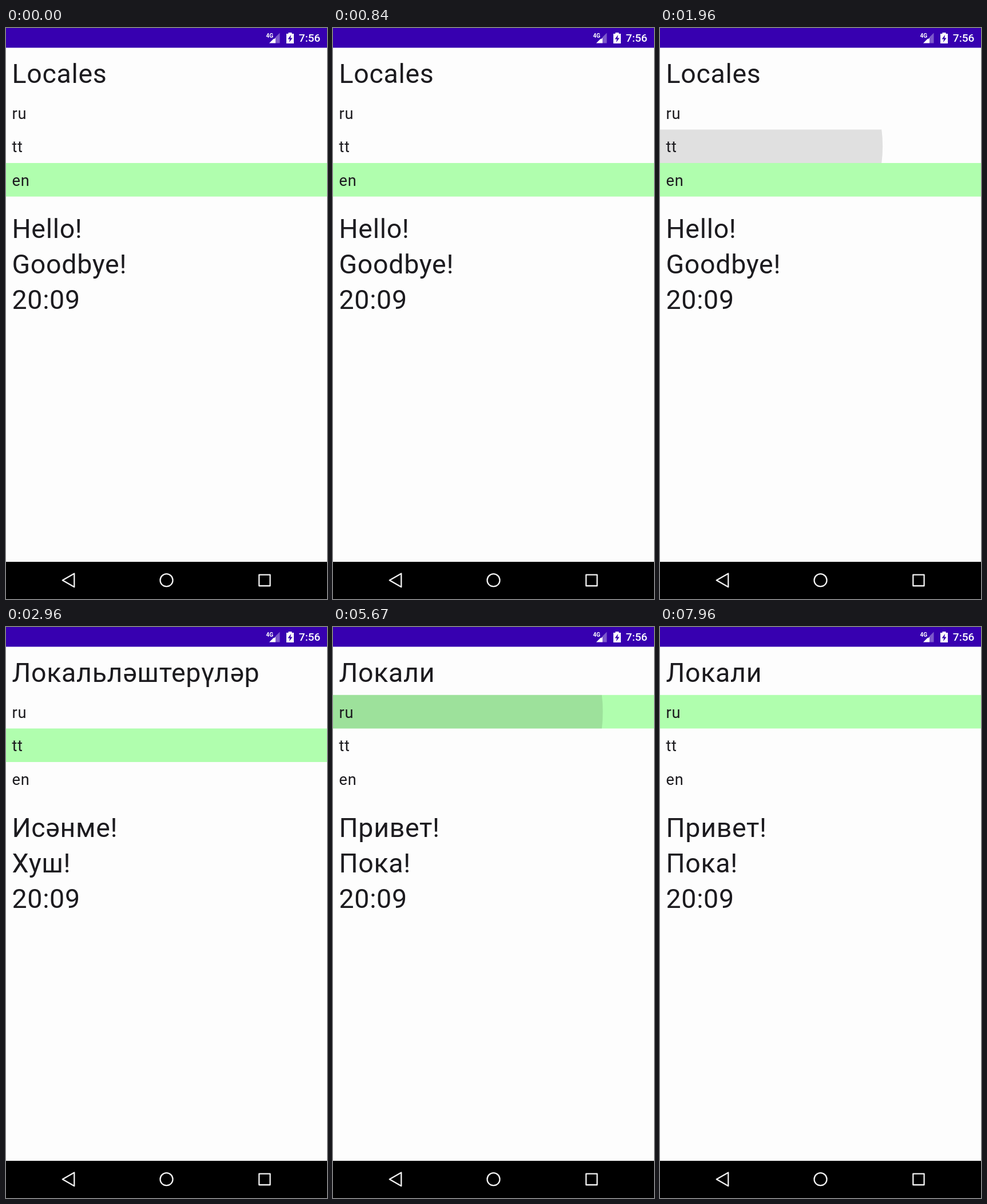
Animation, 561 px wide and 998 px high, one loop 8 s. Source, as an HTML page:

```html
<!DOCTYPE html>
<html lang="en">
<head>
<meta charset="utf-8">
<style>
  html, body { margin: 0; width: 100%; height: 100%; overflow: hidden; background: #fdfdfd; }
  svg { display: block; width: 100vw; height: 100vh; font-family: Roboto, sans-serif; }
  .big { font-size: 46.5px; letter-spacing: .68px; }
  .row { font-size: 27.3px; letter-spacing: .68px; }
</style>
</head>
<body>
<svg viewBox="0 0 561 998">
  <clipPath id="clip"><rect id="clipRow" width="561" height="58.6"/></clipPath>
  <rect width="561" height="998" fill="#fdfdfd"/>
  <rect id="mark" width="561" height="58.6" fill="#b0feae"/>
  <g clip-path="url(#clip)"><circle id="ripple" fill="#1c1b1f"/></g>

  <g fill="#1c1b1f">
    <text id="title" class="big" x="10.5" y="95.5"></text>
    <text class="row" x="10.5" y="158.6">ru</text>
    <text class="row" x="10.5" y="217.2">tt</text>
    <text class="row" x="10.5" y="275.9">en</text>
    <text id="hello" class="big" x="10.5" y="366.8"></text>
    <text id="bye" class="big" x="10.5" y="429"></text>
    <text class="big" x="10.5" y="491.2">20:09</text>
  </g>

  <rect width="561" height="34.5" fill="#3700b0"/>
  <g fill="#fff">
    <text x="454.5" y="17" font-size="10" font-weight="700">4G</text>
    <path d="M478.500 8.500V26.500H471V16Z" opacity=".35"/>
    <path d="M460 26.500L467.500 19H469L471 17V26.500Z"/>
    <path d="M493.500 8H499.500V10H503V27H490V10H493.500Z"/>
    <path d="M498.200 12L492.500 19.500H496L495 25L500.700 17.500H497.200Z" fill="#3700b0"/>
    <text x="511.800" y="24.300" font-size="19.100" font-weight="500">7:56</text>
  </g>

  <rect y="933" width="561" height="65"/>
  <g fill="none" stroke="#f2f2f2" stroke-width="2.3" stroke-linejoin="round">
    <path d="M98.800 965.200L119.300 953.500V977Z"/>
    <circle cx="280.500" cy="965.200" r="11"/>
    <rect x="442.300" y="955.700" width="19.300" height="19.300"/>
  </g>
</svg>
<script>
const LOOP = 8000, ROW_H = 58.6, W = 561;
const rowTop = i => 118.8 + i * ROW_H;
const el = id => document.getElementById(id);

const locales = [
  { from: 0, row: 2, title: 'Locales', hello: 'Hello!', bye: 'Goodbye!' },
  { from: 2000, row: 1, title: 'Локальләштерүләр', hello: 'Исәнме!', bye: 'Хуш!' },
  { from: 5630, row: 0, title: 'Локали', hello: 'Привет!', bye: 'Пока!' }
];
const taps = [
  { at: 1885, row: 1, x: 100 },
  { at: 5578, row: 0, x: 180 }
];

const clamp = v => Math.max(0, Math.min(1, v));
const mix = (a, b, p) => a + (b - a) * p;
const set = (node, attrs) => {
  for (const k in attrs) node.setAttribute(k, attrs[k]);
};

// cubic-bezier(.4, 0, .2, 1)
function ease(x) {
  let lo = 0, hi = 1, s;
  for (let i = 0; i < 24; i++) {
    s = (lo + hi) / 2;
    const bx = 1.2 * s * (1 - s) ** 2 + .6 * s * s * (1 - s) + s ** 3;
    if (bx < x) lo = s; else hi = s;
  }
  return 3 * s * s - 2 * s ** 3;
}

let shown;
function setLocale(l) {
  if (l === shown) return;
  shown = l;
  for (const id of ['title', 'hello', 'bye']) el(id).textContent = l[id];
  set(el('mark'), { y: rowTop(l.row) });
}

// Grow for 225 ms while moving to the row centre, then fade for 150 ms.
function drawRipple(t) {
  const tap = taps.find(p => t >= p.at && t < p.at + 375);
  if (!tap) return set(el('ripple'), { opacity: 0 });
  const age = t - tap.at, p = clamp(age / 225);
  set(el('clipRow'), { y: rowTop(tap.row) });
  set(el('ripple'), {
    cx: mix(tap.x, W / 2, p),
    cy: rowTop(tap.row) + ROW_H / 2,
    r: mix(W * .3, 296, ease(p)),
    opacity: .125 * clamp(age / 75) * (1 - clamp((age - 225) / 150))
  });
}

function draw(now) {
  const t = now % LOOP;
  setLocale(locales.filter(l => t >= l.from).pop());
  drawRipple(t);
}

const start = performance.now();
function tick() {
  draw(performance.now() - start);
  requestAnimationFrame(tick);
}
tick();
</script>
</body>
</html>
```
